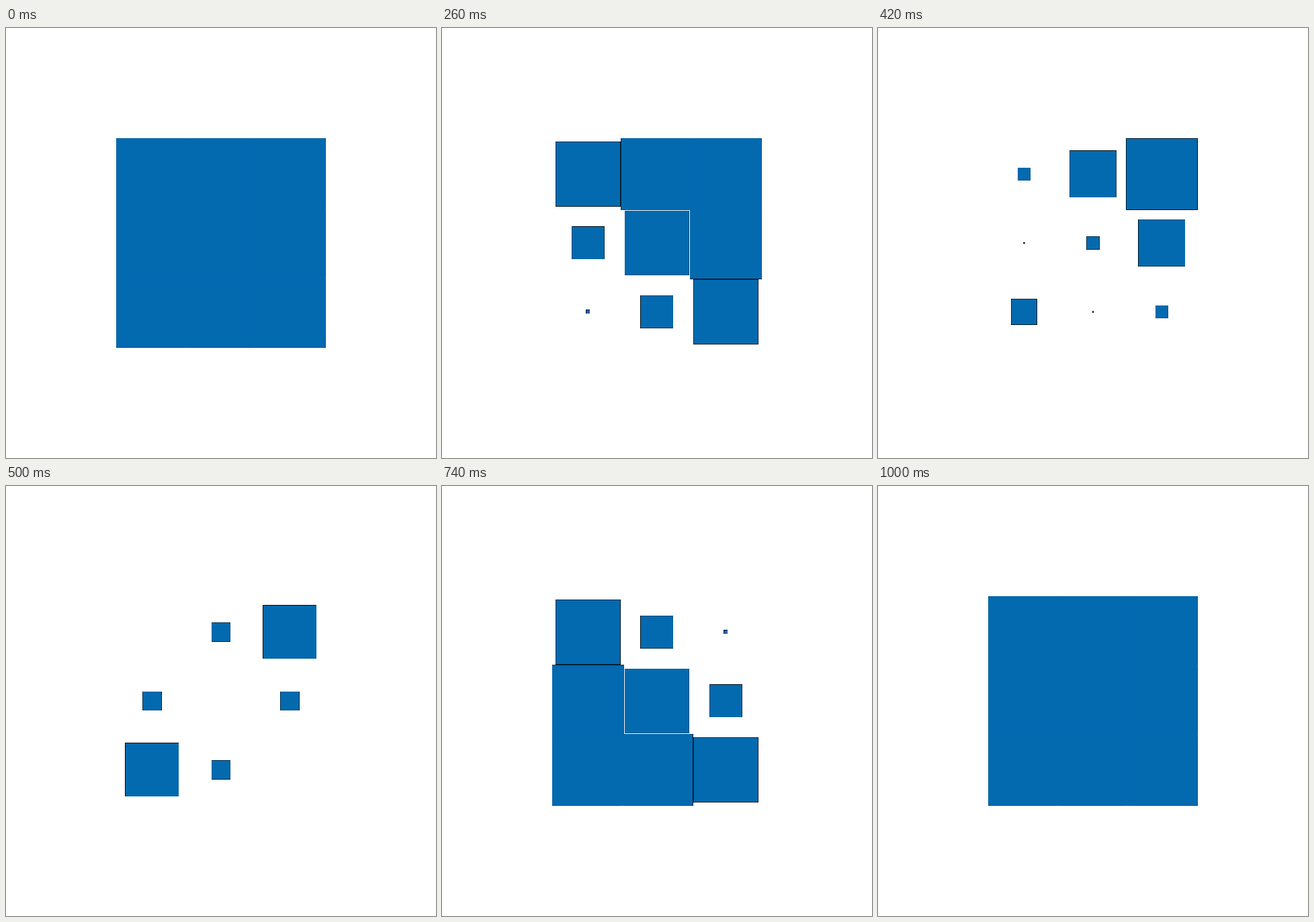
These frames come from a looping animation (640 px wide and 640 px high, 1.42 s). An HTML page with a canvas:

```html
<!DOCTYPE html>
<html lang="en">
<head>
<meta charset="utf-8">
<title>Cube grid loader</title>
<style>
  html, body { margin: 0; width: 100%; height: 100%; overflow: hidden; background: #fff; }
  canvas { display: block; width: 640px; height: 640px; }
</style>
</head>
<body>
<canvas id="stage" width="640" height="640"></canvas>
<script>
  const LOOP = 1420, STEP = 20;
  const HALF = 300;      // time to shrink, and again to grow back
  const STAGGER = 100;   // delay per diagonal, from bottom left to top right
  const SIZE = 320 / 3, PITCH = 102.5, CENTER = 319.9;
  const BLUE = '#036ab0';

  const ctx = document.getElementById('stage').getContext('2d');
  const start = performance.now();

  function scaleAt(t) {
    const u = Math.min(1, Math.abs(t - HALF) / HALF);
    return u * u * (3 - 2 * u);
  }

  function squaresAt(t) {
    const list = [];
    for (let row = 0; row < 3; row++) {
      for (let col = 0; col < 3; col++) {
        const size = SIZE * scaleAt(t - STAGGER * (2 - row + col));
        if (size < 0.05) continue;
        list.push({
          x: CENTER + (col - 1) * PITCH - size / 2,
          y: CENTER + (row - 1) * PITCH - size / 2,
          size
        });
      }
    }
    return list;
  }

  const low = v => Math.floor(v + 0.03);
  const high = v => Math.ceil(v - 0.03);

  function draw(t) {
    const squares = squaresAt(t);
    ctx.fillStyle = '#fff';
    ctx.fillRect(0, 0, 640, 640);

    // Whole-pixel black under the soft blue edges gives the thin dark rims.
    ctx.fillStyle = '#000';
    for (const { x, y, size } of squares) {
      const left = low(x), top = low(y);
      ctx.fillRect(left, top, high(x + size) - left, high(y + size) - top);
    }
    ctx.fillStyle = BLUE;
    for (const { x, y, size } of squares) ctx.fillRect(x, y, size, size);
  }

  function tick() {
    const t = (performance.now() - start) % LOOP;
    draw(Math.floor(t / STEP) * STEP);
    requestAnimationFrame(tick);
  }
  tick();
</script>
</body>
</html>
```
